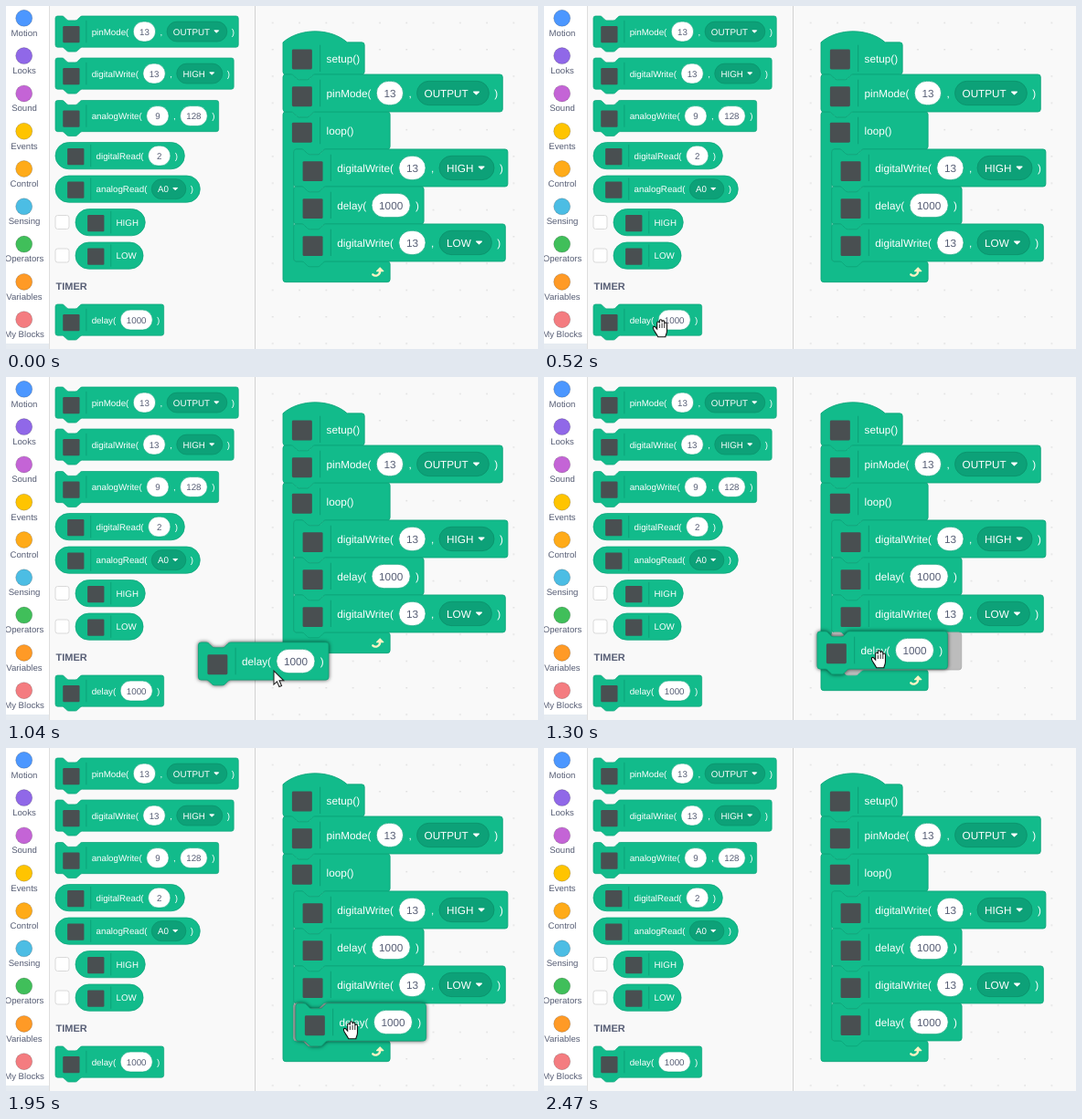
Animation, 582 px wide and 376 px high, one loop 3.25 s. Source, as an HTML page:

```html
<!DOCTYPE html>
<html lang="en">
<head>
<meta charset="utf-8">
<title>Block editor</title>
<style>
  html, body { margin: 0; width: 100%; height: 100%; overflow: hidden; background: #f9f9f9; }
  svg { display: block; width: 582px; height: 376px; font-family: "Liberation Sans", Arial, sans-serif; text-rendering: geometricPrecision; }
  .body { fill: #12bb8b; stroke: #0da57a; stroke-width: 1.2; }
  .marker .body { fill: #bcbcbc; stroke: #adadad; }
  .dragged { filter: drop-shadow(0 0 3px rgba(0, 0, 0, .7)); }
</style>
</head>
<body>
<svg id="stage" viewBox="0 0 582 376"></svg>
<script>
const PALETTE_SCALE = 0.61, WORK_SCALE = 0.732, ROW = 56, FIELD = 36, LOOP = 3250;
const stage = document.getElementById('stage');
const pen = document.createElement('canvas').getContext('2d');
pen.font = '16px "Liberation Sans", Arial, sans-serif';
const textWidth = s => pen.measureText(s).width;

const at = (x, y, scale, content, cls = '') =>
  `<g class="${cls}" transform="translate(${x} ${y}) scale(${scale})">${content}</g>`;
const label = (x, y, s, fill = '#fff', extra = '') =>
  `<text x="${x}" y="${y}" fill="${fill}" font-size="16" ${extra}>${s}</text>`;
const field = (x, mid, w, fill, stroke) =>
  `<rect x="${x}" y="${mid - FIELD / 2}" width="${w}" height="${FIELD}" rx="${FIELD / 2}" fill="${fill}" stroke="${stroke}"/>`;

// Block outlines, in unscaled block units.
const NOTCH = 'c2 0 3 1 4 2l4 4c1 1 2 2 4 2h12c2 0 3-1 4-2l4-4c1-1 2-2 4-2';
const TAB = 'c-2 0-3 1-4 2l-4 4c-1 1-2 2-4 2h-12c-2 0-3-1-4-2l-4-4c-1-1-2-2-4-2';
const corner = (dx, dy, sweep = 1) => `a4 4 0 0 ${sweep} ${dx} ${dy}`;
const rightSide = (w, bottom) => `H${w - 4}${corner(4, 4)}V${bottom - 4}${corner(-4, 4)}`;
const TOP = `M0 4${corner(4, -4)}h8${NOTCH}`;
const CLOSE = `H4${corner(-4, -4)}z`;

const outlines = {
  stack: w => TOP + rightSide(w, ROW) + 'H48' + TAB + CLOSE,
  hat: w => 'M0 0c25-22 71-22 96 0' + rightSide(w, 48) + 'H48' + TAB + CLOSE,
  reporter: w => `M24 0H${w - 24}a24 24 0 0 1 0 48H24a24 24 0 0 1 0-48z`,
  loop: (w, rows) => {
    const floor = ROW * (rows + 1);
    return TOP + rightSide(160, ROW) + 'H64' + TAB + `H20${corner(-4, 4, 0)}V${floor - 4}` +
      corner(4, 4, 0) + rightSide(160, floor + 31) + CLOSE;
  }
};

// Parts: plain string = label, number = editable value, {menu} = dropdown.
function block(shape, parts, rows = 0) {
  const round = shape === 'reporter', tall = shape === 'stack' || shape === 'loop';
  const inset = round ? 8 : 0, mid = tall ? 28 : 24;
  let x = 65 + inset, inner = '';
  for (const part of parts) {
    const s = String(part.menu ?? part);
    let w = textWidth(s);
    if (part.menu) {
      w += 42;
      inner += field(x, mid, w, '#0da178', '#0b8e69') + label(x + 11, mid + 6, s) +
        `<path d="M${x + w - 23} ${mid - 2}h8l-4 4z" fill="#fff" stroke="#fff" stroke-width="1.5" stroke-linejoin="round"/>`;
    } else if (typeof part === 'number') {
      w = Math.max(40, w + 22);
      inner += field(x, mid, w, '#fff', '#0da57a') +
        label(x + w / 2, mid + 6, s, '#575e75', 'text-anchor="middle"');
    } else {
      inner += label(x, mid + 6, s);
    }
    x += w + 8;
  }
  const iconY = mid + (shape === 'stack' ? 5 : shape === 'loop' ? 3 : 1.5) - 15;
  return `<path class="body" d="${outlines[shape](x + (round ? 4 : -1), rows)}"/>` +
    `<rect x="${13.5 + inset}" y="${iconY}" width="30" height="30" rx="2" fill="#494f51"/>` +
    `<path d="M${55.5 + inset} ${mid - 20}v40" stroke="#0da178" stroke-width="1.5"/>` + inner;
}

const pinMode = block('stack', ['pinMode(', 13, ',', {menu: 'OUTPUT'}, ')']);
const write = level => block('stack', ['digitalWrite(', 13, ',', {menu: level}, ')']);
const delay = block('stack', ['delay(', 1000, ')']);
const marker = `<path class="body" d="${outlines.stack(194)}"/>`;

function categories() {
  const list = [['Motion', '#4c97ff'], ['Looks', '#9068e8'], ['Sound', '#c464d6'],
    ['Events', '#ffc400'], ['Control', '#ffab19'], ['Sensing', '#4cbde4'],
    ['Operators', '#40bf5a'], ['Variables', '#ff9a26'], ['My Blocks', '#f47c80']];
  return '<path d="M0 0h47v376h-47z" fill="#fff"/><path d="M0 370h47v6h-47z" fill="#e6ebf1"/>' +
    '<path d="M47.5 0v376" stroke="#dedede"/>' +
    list.map(([name, color], i) => {
      const y = 13.3 + 41.3 * i;
      return `<circle cx="19.7" cy="${y}" r="9" fill="${color}" stroke="#000" stroke-opacity=".18"/>` +
        `<text x="20" y="${y + 19.3}" font-size="9.6" fill="#575e75" text-anchor="middle">${name}</text>`;
    }).join('');
}

function palette() {
  const items = [
    [54, 11, pinMode],
    [54, 57, write('HIGH')],
    [54, 103.5, block('stack', ['analogWrite(', 9, ',', 128, ')'])],
    [54, 149.5, block('reporter', ['digitalRead(', 2, ')'])],
    [54, 186, block('reporter', ['analogRead(', {menu: 'A0'}, ')'])],
    [76, 222.5, block('reporter', ['HIGH'])],
    [76, 259, block('reporter', ['LOW'])],
    [54, 327, delay]
  ];
  const box = y => `<rect x="54" y="${y}" width="15" height="15" rx="2.5" fill="#fff" stroke="#d9d9d9"/>`;
  return '<path d="M272.5 0v376" stroke="#d2d2d2"/>' + box(229.5) + box(266) +
    '<text x="54.5" y="311" font-size="11" font-weight="bold" fill="#575e75">TIMER</text>' +
    items.map(([x, y, content]) => at(x, y, PALETTE_SCALE, content)).join('');
}

const background = '<defs><pattern id="dots" x="277" y="4" width="29.3" height="29.3" patternUnits="userSpaceOnUse">' +
  '<path d="M14 14.5h1.5" stroke="#dcdcdc" stroke-width="1.5"/></pattern></defs>' +
  '<path d="M0 0h582v376H0z" fill="#f9f9f9"/><path d="M273 0h309v376H273z" fill="url(#dots)"/>';
const fixed = background + categories() + palette();

const repeatArrow = '<path d="M-8 5C-3 10 7 7 7-2" fill="none" stroke="#fbf3c4" stroke-width="4.5" stroke-linecap="round"/>' +
  '<path d="M0-2L7-9 14-2z" fill="#fbf3c4" stroke="#fbf3c4" stroke-width="2" stroke-linejoin="round"/>';

// slot: what fills the fourth row of the loop ('' leaves it closed).
function script(slot) {
  const rows = slot ? 4 : 3;
  const children = [write('HIGH'), delay, write('LOW')];
  if (slot) children.push(slot === 'marker' ? marker : delay);
  return at(303, 75, WORK_SCALE,
    at(0, -48, 1, block('hat', ['setup()'])) +
    at(0, ROW, 1, block('loop', ['loop()'], rows)) +
    at(0, 0, 1, pinMode) +
    at(140, ROW * (rows + 2) + 16, 0.72, repeatArrow) +
    children.map((c, i) => at(16, ROW * (i + 2), 1, c, c === marker ? 'marker' : '')).join(''));
}

const cursors = {
  hand: '<path d="M-3 9C-5 5-8 2-8 0c0-2 2-2 3 0l1 1V-5c0-2 2-2 2.5 0V-7c0-2 2.5-2 2.5 0v1c0-2 2.5-2 2.5 0v2c0-2 2.5-2 2.5 0V3c0 3-1.5 4-1.5 6z" fill="#fff" stroke="#111"/>' +
    '<path d="M-1.5-4v4M1-5v5M3.5-4v4" stroke="#111" stroke-width=".8"/>',
  arrow: '<path d="M0 0v14l3.2-3 2.3 5.2 2.4-1-2.3-5.2H10z" fill="#fff" stroke="#222"/>'
};

// The screen changes in hard steps; each entry holds until the next.
const steps = [
  {time: 0},
  {time: 260, cursor: ['arrow', 176, 366]},
  {time: 390, cursor: ['hand', 140, 356]},
  {time: 520, cursor: ['hand', 128, 353]},
  {time: 780, cursor: ['hand', 150, 350], drag: [75, 321]},
  {time: 910, cursor: ['hand', 218, 337], drag: [137, 307]},
  {time: 1040, cursor: ['arrow', 293, 322], drag: [210.5, 291]},
  {time: 1170, cursor: ['hand', 338, 313], drag: [263, 284]},
  {time: 1300, cursor: ['hand', 367, 309], drag: [299, 279], slot: 'marker'},
  {time: 1430, cursor: ['hand', 375, 309], drag: [312, 280], slot: 'marker'},
  {time: 1560, cursor: ['hand', 378, 309], drag: [318, 280], slot: 'marker'},
  {time: 1950, cursor: ['hand', 378, 309], drag: [317, 280], slot: 'marker'},
  {time: 2210, cursor: ['hand', 378, 309], slot: 'block'},
  {time: 2340, cursor: ['arrow', 400, 325], slot: 'block'},
  {time: 2470, slot: 'block'}
];

function render({cursor, drag, slot}) {
  stage.innerHTML = fixed + script(slot) +
    (drag ? at(...drag, WORK_SCALE, delay, 'dragged') : '') +
    (cursor ? at(cursor[1], cursor[2], 1.08, cursors[cursor[0]]) : '');
}

let shown;
function tick() {
  const time = performance.now() % LOOP;
  const step = steps.findLast(s => s.time <= time);
  if (step !== shown) render(shown = step);
  requestAnimationFrame(tick);
}
tick();
</script>
</body>
</html>
```
